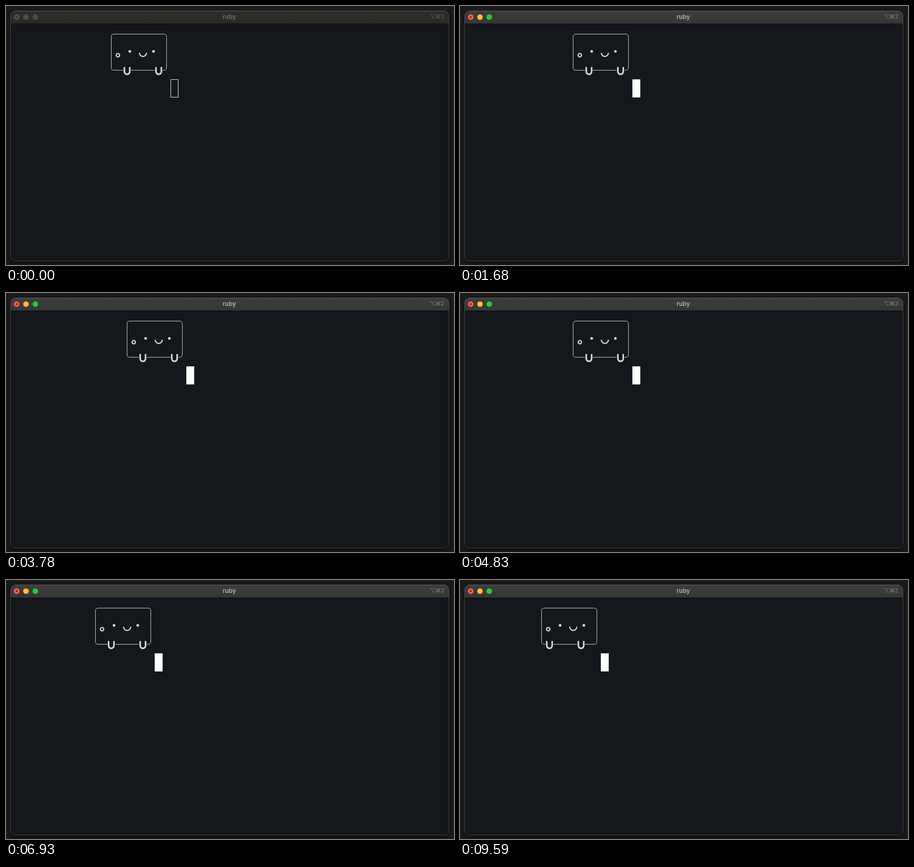
These frames come from a looping animation (964x558 px, 9800 ms). An HTML page:

```html
<!DOCTYPE html>
<html lang="en">
<head>
<meta charset="utf-8">
<title>Walking box</title>
<style>
  html, body { margin: 0; width: 100%; height: 100%; overflow: hidden; background: #1b1b1a; }
  svg { display: block; }
  text { font: 600 13px Inter, "DejaVu Sans", sans-serif; }
  #title { fill: #b3b3b3; }
  #keys { fill: #747474; font-size: 12px; }
  #cursor { fill: #fff; stroke: #fff; }
  .blur #bar { fill: url(#dimBar); }
  .blur #title { fill: #70706c; }
  .blur #keys { fill: #545450; }
  .blur #lights circle { fill: #4d4d4b; }
  .blur #lights .dot { fill: #2b2b29; }
  .blur #cursor { fill: none; }
</style>
</head>
<body>
<svg id="stage" width="964" height="558" viewBox="0 0 964 558">
  <defs>
    <linearGradient id="liveBar" x2="0" y2="1">
      <stop stop-color="#3d3d3d"/><stop offset="1" stop-color="#363636"/>
    </linearGradient>
    <linearGradient id="dimBar" x2="0" y2="1">
      <stop stop-color="#2d2d28"/><stop offset="1" stop-color="#292925"/>
    </linearGradient>
    <filter id="soft" x="-5%" y="-5%" width="110%" height="110%"><feGaussianBlur stdDeviation="4"/></filter>
    <path id="foot" d="M2.7 131.5V141.4a5.8 5.8 0 0 0 11.6 0V131.5" fill="none" stroke-width="3.3"/>
  </defs>

  <rect x="10" y="15" width="944" height="540" rx="12" opacity=".5" filter="url(#soft)"/>
  <rect x="8" y="9" width="947" height="542" rx="11" fill="#050505"/>
  <rect x="9.5" y="10.5" width="944" height="539" rx="9.5" fill="#14181c" stroke="#505355"/>
  <path id="bar" d="M10 38V20a9 9 0 0 1 9-9H944a9 9 0 0 1 9 9V38z" fill="url(#liveBar)"/>
  <path d="M18 10.5H945" stroke="#6c6c6a"/>
  <path d="M10 38.5H953" stroke="#050505"/>
  <g id="lights">
    <circle cx="23" cy="24" r="6" fill="#ff5f57"/>
    <circle class="dot" cx="23" cy="24" r="2" fill="#8c0b08"/>
    <circle cx="43" cy="24" r="6" fill="#febc2e"/>
    <circle cx="63" cy="24" r="6" fill="#28c840"/>
  </g>
  <text id="title" x="480.5" y="28" text-anchor="middle">ruby</text>
  <text id="keys" x="943" y="27" text-anchor="end">⌥⌘2</text>

  <g id="buddy">
    <rect x="226.5" y="60.5" width="119" height="78" rx="5.5" fill="none" stroke="#dedede"/>
    <path d="M345 79.5h1M345 119.5h1" stroke="#14181c" stroke-opacity=".6"/>
    <g fill="none" stroke="#dedede" stroke-width="2.4">
      <circle cx="240.8" cy="106" r="3.6"/>
      <path d="M287 100.8a7.7 8 0 0 0 15.4 0"/>
    </g>
    <g fill="#dedede">
      <circle cx="266.4" cy="97.8" r="2.8"/>
      <circle cx="317.5" cy="97.8" r="2.8"/>
    </g>
    <g id="feet" stroke="#dedede">
      <path d="M0 138.5h17M68 138.5h17" stroke="#14181c" stroke-width="2"/>
      <use href="#foot"/>
      <use href="#foot" x="68"/>
    </g>
    <rect id="cursor" x="354.5" y="158.5" width="16" height="38"/>
  </g>
</svg>
<script>
  const LOOP = 9800, FOCUS = 420, CELL = 17;
  // Each step swaps the feet; the second value is how many cells the body moves.
  const steps = [
    [70, 0], [630, 0], [1120, 0], [1680, 1], [2170, 1], [2730, 0], [3220, 1],
    [3780, -1], [4340, 0], [4830, -1], [5390, -1], [5880, 0], [6440, -1],
    [6930, -1], [7490, 0], [8050, -1], [8540, 0], [9030, 0], [9590, 0]
  ];
  const $ = id => document.getElementById(id);
  const start = performance.now();

  function draw(time) {
    const t = Math.max(0, time - start) % LOOP;
    const taken = steps.filter(([at]) => at <= t);
    const cells = taken.reduce((sum, [, move]) => sum + move, 0);
    $("buddy").setAttribute("transform", `translate(${cells * CELL} 0)`);
    $("feet").setAttribute("transform", `translate(${taken.length % 2 ? 235 : 252} 0)`);
    $("stage").classList.toggle("blur", t < FOCUS);
    requestAnimationFrame(draw);
  }
  draw(start);
</script>
</body>
</html>
```
